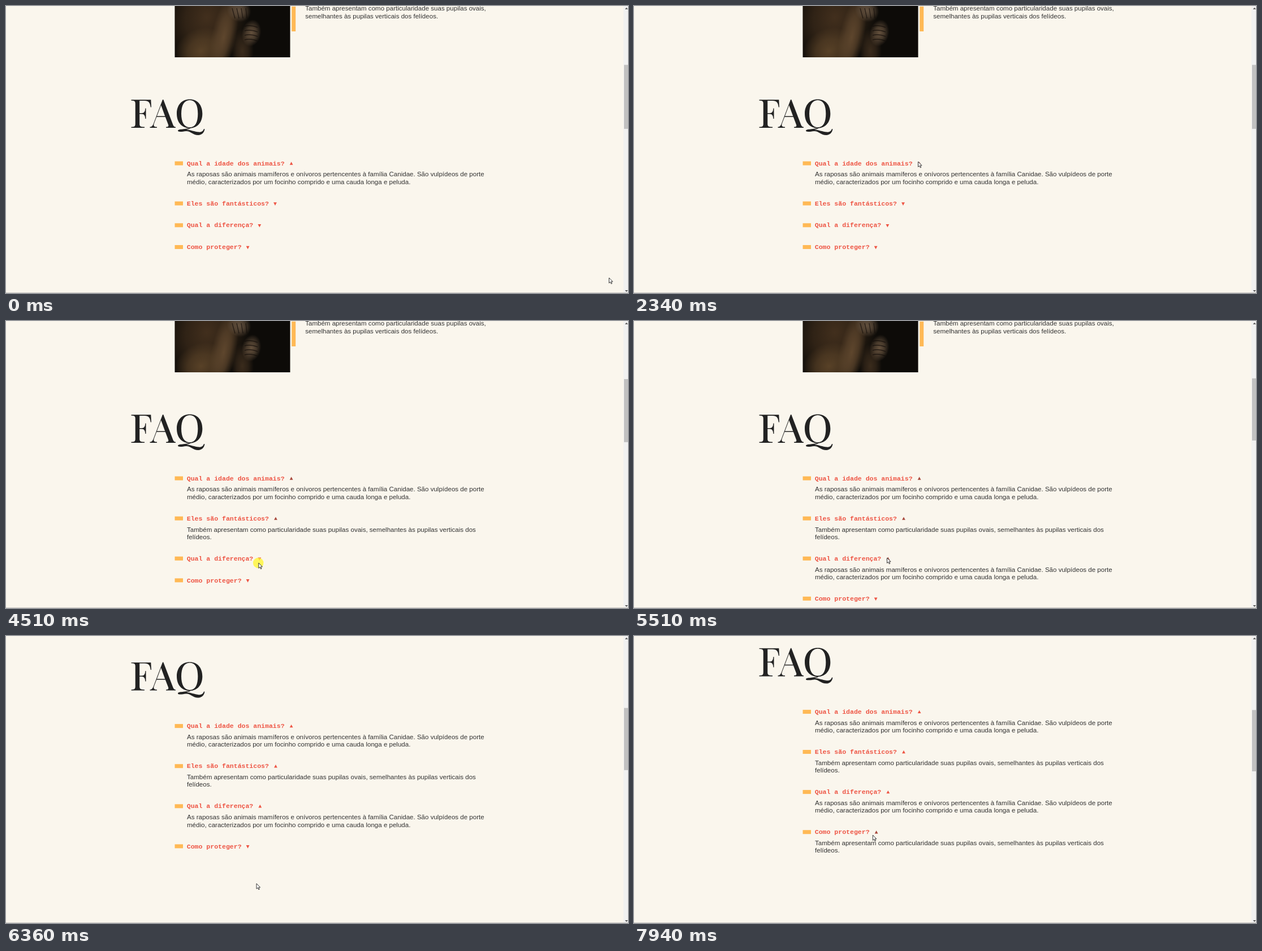
Write an HTML page with a canvas that moves like this. It is 1100 by 509 pixels and loops after 8 s.

```html
<!DOCTYPE html>
<html lang="pt-BR">
<head>
<meta charset="utf-8">
<title>FAQ</title>
<style>
  html, body { margin: 0; width: 100%; height: 100%; overflow: hidden; background: #faf6ed; }
  canvas { display: block; width: 1100px; height: 509px; }
</style>
</head>
<body>
<canvas id="stage" width="1100" height="509" aria-label="FAQ"></canvas>
<script>
const ctx = document.getElementById('stage').getContext('2d');
const LOOP = 8000;
const PAPER = '#faf6ed', INK = '#222', TEXT = '#333', RED = '#ee5544', DARK_RED = '#a8483c', AMBER = '#ffb955';
const BODY_FONT = '11.56px "Liberation Sans", Arial, sans-serif';
const TITLE_FONT = 'bold 11.52px "Liberation Mono", "Courier New", monospace';
const LINE = 13.35, PITCH = 38.7, GAP = 5.9, ANSWER = 26.5;

const FOX = ['As raposas são animais mamíferos e onívoros pertencentes à família Canidae. São vulpídeos de porte',
  'médio, caracterizados por um focinho comprido e uma cauda longa e peluda.'];
const EYES = ['Também apresentam como particularidade suas pupilas ovais, semelhantes às pupilas verticais dos',
  'felídeos.'];
const ITEMS = [
  { title: 'Qual a idade dos animais?', lines: FOX, openAt: 2130, closeAt: 1540 },
  { title: 'Eles são fantásticos?', lines: EYES, openAt: 3330 },
  { title: 'Qual a diferença?', lines: FOX, openAt: 5310 },
  { title: 'Como proteger?', lines: EYES, openAt: 7280 }
];
const SCROLL_START = 6040;

// Cursor stops: time, x, y
const CURSOR = [
  [0, 1066.5, 482], [60, 1066.5, 482], [860, 500.5, 276], [930, 502.5, 276], [2400, 502.5, 276],
  [3000, 474.5, 350.5], [3820, 474.5, 350.5], [4290, 446.8, 429], [4680, 446.8, 429],
  [5050, 447.5, 420], [5520, 447.5, 420], [6000, 444, 448], [6160, 444, 448],
  [6360, 443, 439], [6890, 426.5, 348.5], [7560, 426.5, 348.5], [7880, 423, 352.5], [7940, 422.3, 353]
];
const PRESSES = [[1400, 1600], [2000, 2200], [3140, 3400], [4510, 4640], [5180, 5380], [7150, 7350]];
const SCROLL = [[0, 0], [SCROLL_START, 0], [6110, 26.7], [6360, 119.2], [6500, 144.6]];

const clamp = v => Math.max(0, Math.min(1, v));
const smooth = p => p * p * (3 - 2 * p);

function sample(stops, t, ease) {
  let i = 0;
  while (i < stops.length - 1 && stops[i + 1][0] <= t) i++;
  const a = stops[i], b = stops[i + 1];
  if (!b) return a.slice(1);
  const p = ease((t - a[0]) / (b[0] - a[0]));
  return a.slice(1).map((v, k) => v + (b[k + 1] - v) * p);
}

// Answers slide down with a growing maximum height and fade in.
function answerState(item, t) {
  if (item.closeAt && t < item.closeAt) return { open: true, height: GAP + ANSWER, alpha: 1 };
  if (t < item.openAt) return { open: false, height: 0, alpha: 0 };
  const e = 1 - (1 - clamp((t - item.openAt) / 200)) ** 2;
  return { open: true, height: GAP + Math.min(ANSWER, 57 * e), alpha: e };
}

function rect(x, y, w, h, color) {
  ctx.fillStyle = color;
  ctx.fillRect(x, y, w, h);
}

function text(s, x, y, font, color) {
  ctx.font = font;
  ctx.fillStyle = color;
  ctx.fillText(s, x, y);
}

function triangle(x, y, halfWidth, height, color) {
  ctx.fillStyle = color;
  ctx.beginPath();
  ctx.moveTo(x - halfWidth, y + height / 2);
  ctx.lineTo(x + halfWidth, y + height / 2);
  ctx.lineTo(x, y - height / 2);
  ctx.fill();
}

function glow(x, y, rx, ry, angle, color) {
  ctx.save();
  ctx.translate(x, y);
  ctx.rotate(angle);
  ctx.scale(rx, ry);
  const g = ctx.createRadialGradient(0, 0, 0, 0, 0, 1);
  g.addColorStop(0, `rgba(${color},1)`);
  g.addColorStop(0.5, `rgba(${color},.65)`);
  g.addColorStop(1, `rgba(${color},0)`);
  ctx.fillStyle = g;
  ctx.fillRect(-1, -1, 2, 2);
  ctx.restore();
}

function drawPhoto() {
  ctx.save();
  ctx.beginPath();
  ctx.rect(298.5, -60, 204, 151);
  ctx.clip();
  rect(298, -60, 205, 152, '#0d0b08');
  glow(355, 20, 75, 90, 0.3, '66,47,29');
  glow(345, 80, 50, 40, -0.5, '88,65,39');
  glow(385, 55, 22, 75, 0.2, '94,70,45');
  glow(418, 80, 20, 40, 0, '58,43,28');
  glow(412, 8, 22, 20, 0.5, '98,80,62');
  glow(434, 48, 17, 24, 0.2, '100,80,60');
  ctx.strokeStyle = 'rgba(15,11,8,.6)';
  ctx.lineWidth = 1.5;
  for (let i = 0; i < 4; i++) {
    ctx.beginPath();
    ctx.moveTo(422, 36 + i * 8);
    ctx.quadraticCurveTo(432, 33 + i * 8, 445, 38 + i * 8);
    ctx.moveTo(400 + i * 8, 4);
    ctx.lineTo(405 + i * 7, 22);
    ctx.stroke();
  }
  ctx.restore();
}

const HEADING = [
  // F
  'M221.5 166.3H256.3L257 179.5H255.8C254.6 171.5 252.5 168 245 168H236.2V190H240C244.5 190 246 187 246.3 181.5H247.5V200H246.3' +
  'C246 194.5 244.5 191.5 240 191.5H236.2V209C236.2 213.5 238 214.6 245 214.6V216H221.5V214.6C227 214.6 228.7 213.5 228.7 209V173' +
  'C228.7 168.8 227 167.7 221.5 167.7Z',
  // A
  'M277 166H278.3L295.5 211C296.7 213.8 298 214.6 300 214.6V216H283V214.6C287 214.6 288 213 286.8 210L281.8 196.8H266.3L262 208' +
  'C260.2 212.8 262 214.6 267 214.6V216H254.5V214.6C257.3 214.6 259.2 213 260.7 209ZM274.2 176L266.9 195.3H281.2Z',
  // Q
  'M325 165.6C338.5 165.6 347.3 175.5 347.3 191C347.3 206.5 338.5 216.6 325 216.6C311 216.6 302 206.5 302 191C302 175.5 311 165.6 325 165.6Z' +
  'M325 167C315 167 310 176 310 191C310 206 315 215.2 325 215.2C335 215.2 339.3 206 339.3 191C339.3 176 335 167 325 167Z',
  'M326 215.5C319 219.5 304 217.5 304 221.3C304 224 312 222.8 318 222C326 221 330 228.9 340 228.9C346.5 228.9 351 224 351.3 218' +
  'H350C348.5 222.3 345.5 224 341 223.6C333 223 327 219.3 319 219.4C323 218.6 326 217.5 328 215.5Z'
].map(d => new Path2D(d));

function drawHeading() {
  ctx.fillStyle = INK;
  HEADING.forEach(path => ctx.fill(path, 'evenodd'));
}

function drawItems(t) {
  let y = 279;
  ITEMS.forEach((item, i) => {
    const { open, height, alpha } = answerState(item, t);
    rect(298.5, y - 3.5, 14.5, 7, AMBER);
    text(item.title, 319.8, y + 3.6, TITLE_FONT, RED);
    const end = 320 + item.title.length * 6.912;
    if (open) {
      const reopened = t >= item.openAt && (t < SCROLL_START || i === 3);
      triangle(end + 11.8, y, 2.9, 5.4, reopened ? DARK_RED : RED);
      ctx.globalAlpha = alpha;
      item.lines.forEach((line, k) => text(line, 320, y + 23.4 + k * LINE, BODY_FONT, TEXT));
      ctx.globalAlpha = 1;
    } else {
      triangle(end + 10.8, y + 1, 2.9, -5.6, RED);
    }
    y += PITCH + height;
  });
}

function drawScrollbar(t, scroll) {
  const track = 489;
  const extra = ITEMS.reduce((sum, item) => sum + answerState(item, t).height, 0) - GAP - ANSWER;
  const ratio = track / (2189 + extra);
  rect(1092, 0, 8, 508, '#f1f1f1');
  rect(1093, 9.7 + (424 + scroll) * ratio, 7, 508 * ratio, '#c1c1c1');
  triangle(1097.3, 4.3, 2.6, 3, '#505050');
  triangle(1097.3, 505.5, 2.6, -3, '#505050');
  rect(0, 508, 1100, 1, '#c9c7c2');
}

const ARROW = new Path2D('M0 0V9.4L2.2 7.4L3.8 10.8L5.2 10.2L3.7 6.9H6.6Z');

function drawCursor(t) {
  const [x, y] = sample(CURSOR, t, smooth);
  if (PRESSES.some(([from, to]) => t >= from && t < to)) {
    ctx.fillStyle = 'rgba(255,246,50,.78)';
    ctx.beginPath();
    ctx.arc(x - 0.6, y, 9.3, 0, 2 * Math.PI);
    ctx.fill();
  }
  ctx.save();
  ctx.translate(x, y);
  ctx.fillStyle = '#fff';
  ctx.strokeStyle = '#222';
  ctx.lineWidth = 0.9;
  ctx.fill(ARROW);
  ctx.stroke(ARROW);
  ctx.restore();
}

function draw(t) {
  const [scroll] = sample(SCROLL, t, p => p);
  rect(0, 0, 1100, 509, PAPER);
  ctx.save();
  ctx.translate(0, -scroll);
  drawPhoto();
  rect(505.3, 1, 6.9, 44, AMBER);
  text('Também apresentam como particularidade suas pupilas ovais,', 529.2, 8.4, BODY_FONT, TEXT);
  text('semelhantes às pupilas verticais dos felídeos.', 529.2, 21.8, BODY_FONT, TEXT);
  drawHeading();
  drawItems(t);
  ctx.restore();
  drawScrollbar(t, scroll);
  drawCursor(t);
}

const start = performance.now();
function tick() {
  draw((performance.now() - start) % LOOP);
  requestAnimationFrame(tick);
}
tick();
</script>
</body>
</html>
```
